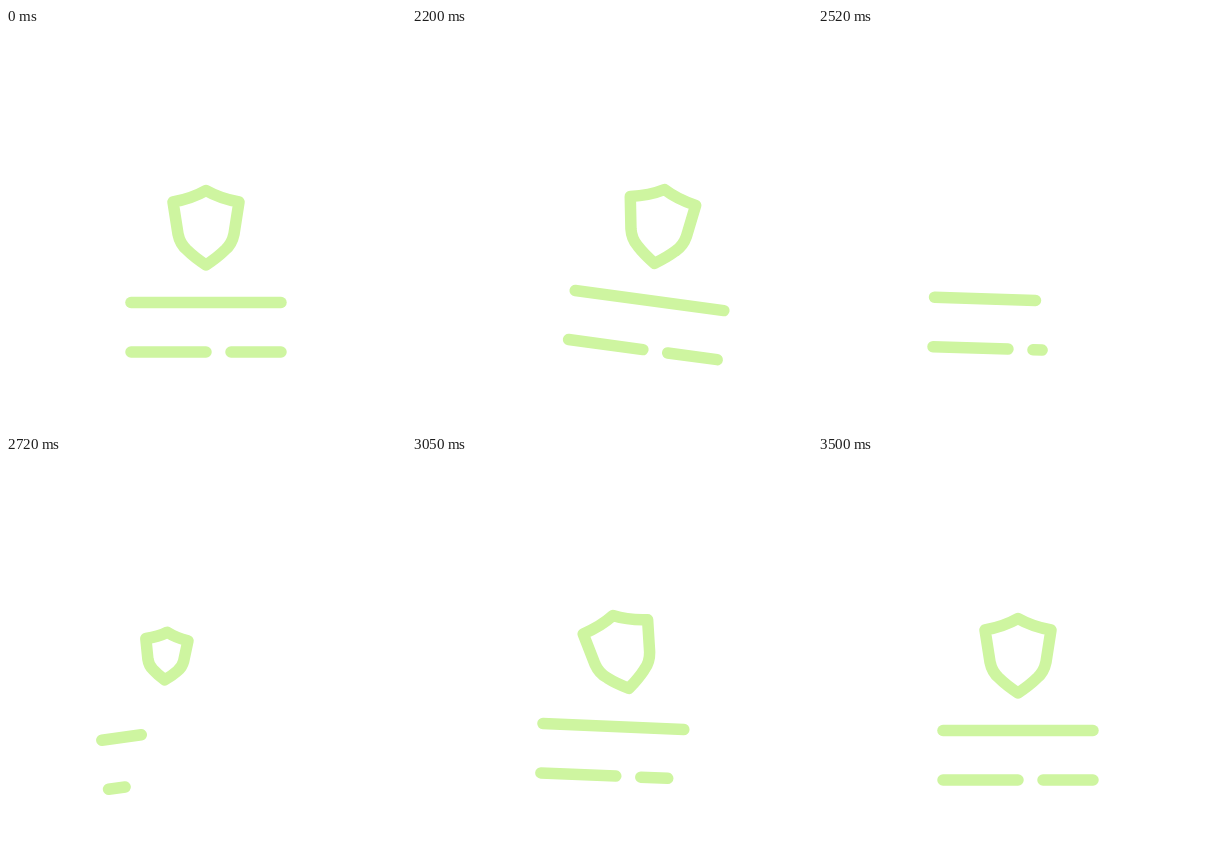
These frames come from a looping animation (400 px wide and 400 px high, 3520 ms). An HTML page:

```html
<!DOCTYPE html>
<html lang="en">
<head>
<meta charset="utf-8">
<title>Shield document</title>
<style>
  html, body { margin: 0; width: 100%; height: 100%; overflow: hidden; background: #fff; }
  svg { display: block; width: 100%; height: 100%; }
  .ink { fill: none; stroke: #cef5a0; stroke-width: 11.5; stroke-linecap: round; stroke-linejoin: round; }
  #shield { stroke-linecap: butt; }
</style>
</head>
<body>
<svg viewBox="0 0 400 400">
  <g id="doc" class="ink">
    <path id="shield" pathLength="1" d="M200 162.5Q214 170.5 233 174L228 206Q226 216 219 222Q212 229 200 237Q188 229 181 222Q174 216 172 206L167 174Q186 170.5 200 162.5Z"/>
    <path id="top"/>
    <path id="low"/>
  </g>
</svg>
<script>
const LOOP = 3520, STEP = 25, WIDTH = 11.5;
const [doc, shield, topLine, low] = ['doc', 'shield', 'top', 'low'].map(id => document.getElementById(id));

const progress = (t, from, to) => Math.min(1, Math.max(0, (t - from) / (to - from)));
const easeIn = p => p * p;
const easeOut = p => 1 - (1 - p) ** 2;

// Smooth curve through [time, value] keys that comes to rest at every extreme.
function curve(...keys) {
  const slope = i => (keys[i + 1][1] - keys[i][1]) / (keys[i + 1][0] - keys[i][0]);
  const tangent = keys.map((_, i) => {
    if (i === 0 || i === keys.length - 1) return 0;
    const a = slope(i - 1), b = slope(i);
    return a * b > 0 ? 2 * a * b / (a + b) : 0;
  });
  return t => {
    if (t <= keys[0][0]) return keys[0][1];
    const i = keys.findIndex(k => k[0] >= t) - 1;
    if (i < 0) return keys[keys.length - 1][1];
    const [t0, v0] = keys[i], [t1, v1] = keys[i + 1];
    const h = t1 - t0, s = (t - t0) / h, r = 1 - s;
    return v0 * r * r * (1 + 2 * s) + v1 * s * s * (3 - 2 * s)
      + h * s * r * (tangent[i] * r - tangent[i + 1] * s);
  };
}

const docX = curve([2000, 0], [2200, 47.5], [2270, 53.5], [2420, 34.9], [2520, -5],
  [2725, -40], [3050, 9], [3100, 10.5], [3400, 0]);
const docY = curve([2000, 0], [2200, -1.3], [2420, -3.5], [2720, 0.1], [2770, 1.5],
  [3050, -3.8], [3400, 0]);
const docTurn = curve([2000, 0], [2200, 7.7], [2280, 8.4], [2420, 6.5], [2520, 2],
  [2740, -7.9], [3050, 2.4], [3110, 2.7], [3400, 0]);
const shieldTurn = curve([2645, 0], [2760, 14], [3040, -15], [3260, 7], [3480, 0]);

const segment = (x, y, length) => length > 0 ? `M${x} ${y}h${length}` : '';

function drawLines(t) {
  const left = 1 - easeIn(progress(t, 2425, 2600));
  const upper = 150 * (t < 2620 ? left : easeOut(progress(t, 2649, 3180)));
  const lower = 125 * (t < 2620 ? left : easeOut(progress(t, 2680, 3328)));
  topLine.setAttribute('d', segment(125, 274.5, upper));
  low.setAttribute('d', segment(125, 324, Math.min(75, lower)) + segment(225, 324, lower - 75));
}

function drawShield(t) {
  const erasing = t < 2620;
  const gap = erasing ? easeIn(progress(t, 2300, 2520)) : 0;
  const scale = erasing ? 1 : easeOut(progress(t, 2645, 2845));
  shield.style.display = gap === 1 || scale === 0 ? 'none' : '';
  if (scale === 0) return;
  // The gap opens both ways from the middle of the upper right edge.
  shield.setAttribute('stroke-dasharray', gap ? `${1 - gap} ${gap}` : 'none');
  shield.setAttribute('stroke-dashoffset', -(0.08 + gap / 2));
  shield.style.strokeWidth = WIDTH / scale;
  shield.setAttribute('transform',
    `translate(200 200) rotate(${shieldTurn(t)}) scale(${scale}) translate(-200 -200)`);
}

function draw() {
  const t = Math.floor((performance.now() % LOOP + 6) / STEP) * STEP;
  doc.setAttribute('transform', `translate(${docX(t)} ${docY(t)}) rotate(${docTurn(t)} 200 200)`);
  drawLines(t);
  drawShield(t);
  requestAnimationFrame(draw);
}
draw();
</script>
</body>
</html>
```
